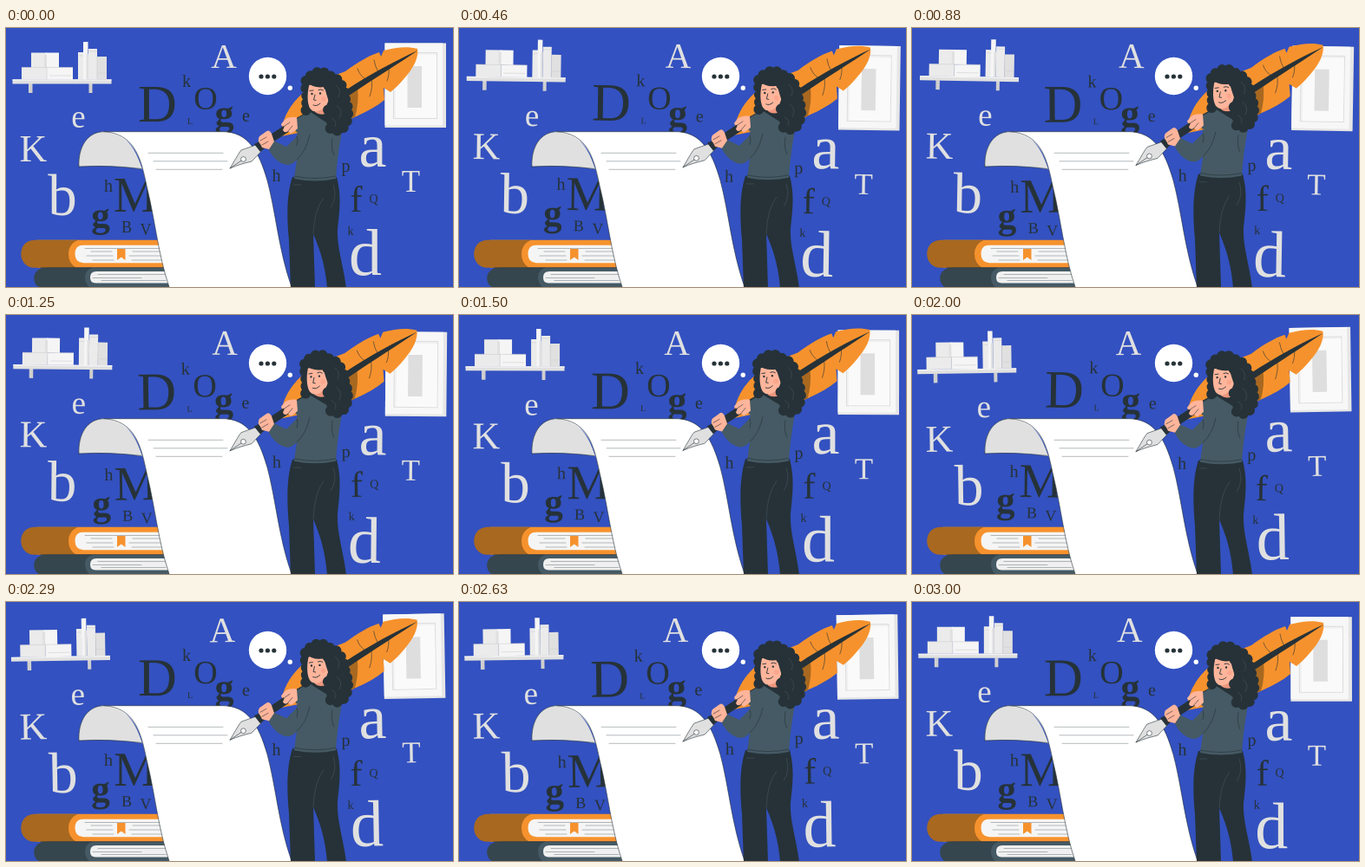
Animation of 515 by 299 pixels, one loop 3.04 s. Source, as an HTML page:

```html
<!DOCTYPE html>
<html lang="en">
<head>
<meta charset="utf-8">
<title>Writer with a quill</title>
<style>
html, body { margin: 0; width: 100%; height: 100%; overflow: hidden; background: #3351c0; }
svg { display: block; width: 100vw; height: 100vh; }
text { font-family: "Liberation Serif", "Noto Serif", serif; text-anchor: middle; }
.line { fill: none; stroke: #263238; stroke-width: .6; stroke-linecap: round; stroke-linejoin: round; }
.dark { fill: #263238; }
.teal { fill: #455a64; }
.orange { fill: #f6922d; }
.brown { fill: #a86820; }
.skin { fill: #ffb59b; }
.pale { fill: #e0e0e0; }
.white { fill: #fff; }
.soft { stroke: #6b7579; stroke-width: .5; }
.curls { fill: none; stroke: #263238; stroke-width: 12; stroke-linecap: round; stroke-dasharray: 0 8.5; }
</style>
</head>
<body>
<svg viewBox="0 0 515 299">
  <g id="light">
    <!-- shelf -->
    <path fill="#cfcfcf" d="M26 64h4.500v11h-4.500zM95.500 64h4v11h-4z"/>
    <path class="pale" d="M7.500 59.500h114v5h-114z"/>
    <path fill="#f2f2f2" d="M7.500 59.300h114v1.500h-114z"/>
    <path fill="#ebebeb" d="M29 28.500h18v17H29zM18 45.500h29v14H18zM83 28h6.500v31.500H83zM95 24h10v35.500H95z"/>
    <path fill="#f5f5f5" d="M46 28.500h15v17H46zM47 45.500h30v14H47zM89 16h5.500v43.500H89z"/>
    <path class="pale" d="M105 33h11v26.500h-11zM44 31h3v14.500h-3zM92.500 30h2.500v29.500h-2.500z"/>
    <path fill="none" stroke="#cfcfcf" stroke-width=".6" d="M18 45.500h59M47 45.500v14M84 32h5M95 27h10M105 33v26M106 52h9M50 55h25"/>
    <!-- picture -->
    <path fill="#e6e6e6" d="M436.500 17.500H507V115H436.500z"/>
    <path fill="#f7f7f7" d="M436.500 17.500H503V112.500H436.500z"/>
    <path fill="#f1f1f1" stroke="#dcdcdc" d="M446.500 28.500h50v76h-50z"/>
    <path fill="#fafafa" d="M449 31h47v73h-47z"/>
    <path fill="#dedede" d="M462.500 44H479v48h-16.500z"/>
  </g>
  <g id="ink"></g>

  <!-- books -->
  <path class="orange" d="M36 244.700H200V276.700H36z"/>
  <path class="brown" d="M33 244.700C12 244.700 12 276.700 33 276.700H81Q72 272 72 260.700T83 244.700z"/>
  <path fill="#f5f5f5" d="M200 250.700H89Q79.500 250.700 79.500 260.700T89 271.200H200z"/>
  <path class="orange" d="M128 255h9.500v13l-4.700-3.500-4.800 3.500z"/>
  <path class="line soft" d="M91 254.500h94M98 258h24M146 258h38M93 263h30M142 263h43M100 268h24M145 268h40"/>
  <path class="teal" d="M48 276.700H200V299H48z"/>
  <path fill="#35464e" d="M46 276.700C30 276.700 29 294 38 299H96Q91 295 91 287.500T99 276.700z"/>
  <path fill="#f0f0f0" d="M200 281H104Q97 281 97 288T104 294.500H200z"/>
  <path class="line soft" d="M106 284.500h78M100 288.500h56M110 291.500h74"/>
  <path class="line" d="M40 276.700H186"/>

  <!-- scroll -->
  <path class="pale" d="M84 160C83 137 94 119.700 113 119.700 139 121 149 139 157 163 130 159 108 158.500 84 160z"/>
  <path class="white" d="M108 119.700H250C278 120 291 141 301 176 311 213 314 257 329 299H188C175 261 172 222 162 182 155 147 147 122 108 119.700z"/>
  <path class="line" d="M84 160C83 137 94 119.700 113 119.700H250C278 120 291 141 301 176 311 213 314 257 329 299M84 160Q120 158 156 162.500M113 119.700C147 122 155 147 162 182 172 222 175 261 188 299"/>
  <path class="line soft" d="M164 144.300H250M170 153.800H255M173 163.300H249"/>

  <!-- thought bubble -->
  <circle class="white" cx="301.500" cy="55.500" r="21.700"/>
  <circle class="white" cx="327.300" cy="69.300" r="2.700"/>
  <g class="dark"><circle cx="294" cy="56" r="2.600"/><circle cx="301.400" cy="56" r="2.600"/><circle cx="308.800" cy="56" r="2.600"/></g>

  <!-- trousers -->
  <g id="legs">
    <path class="dark" d="M330 172C324 190 323 214 326 245L328 300H356L354 238C362 256 368 275 370 300H392C389 275 381 254 382 232 384 213 387 194 381 172z"/>
    <path fill="none" stroke="#46555c" stroke-width=".6" d="M354 238Q355 210 366 196M377 181Q382 196 374 207M331 181H340"/>
  </g>

  <g id="body">
    <g id="quill">
      <path class="orange" d="M317 125C317 103 331 80 355 66 369 58 381 54 391 50 406 39 418 32 430 28L432 33 435 26C450 22 463 21 474 24 476 34 469 47 459 58 453 65 448 70 443 74L435 69 436 83C418 98 391 108 366 115 348 119 332 122 317 125z"/>
      <path class="brown" d="M331 115L394 76 405 69Q407 86 402 103 370 116 336 120z"/>
      <path class="dark" d="M474.500 26C450 37 420 53 391 72L329 107 291 132 295 140 333 115 395 78C425 58 452 41 474.500 26z"/>
      <path class="line" d="M429 51Q425 44 424 37M414 59Q407 54 405 47M441 45Q442 54 439 61M421 59Q423 68 419 79"/>
      <path class="pale" stroke="#263238" stroke-width=".6" d="M258 162C263 154 267 146 271 141L288 135 294 142.500 283 154C275 156 267 158 258 162z"/>
      <path class="line" d="M258 162L272 152.500"/>
      <circle class="white" cx="273.500" cy="151.500" r="2.900" stroke="#263238" stroke-width=".6"/>
      <path class="dark" d="M286 134L294 130 299 138 293 143z"/>
    </g>
    <!-- far hand -->
    <path class="teal" d="M331 107L350 96 351 116 334 120z"/>
    <path class="skin" d="M335 103Q326 102 321 106L317 111Q317 114 321 113L319 118Q321 122 325 119L328 122Q333 119 336 116z"/>
    <path class="line" d="M321 113L327 109M325 119L330 113"/>
    <!-- sweater -->
    <path class="teal" d="M349 96C339 101 336 113 335 125L323 137 308 130 301 137C306 148 314 157 324 158Q330 158 335 152L332 174Q356 179 380 174C381 158 383 142 386 125 389 107 382 97 368 95z"/>
    <path fill="none" stroke="#263238" stroke-width=".6" d="M335 152Q346 142 350 123M332 171Q356 176 380 171M335 125Q337 130 335 136M376 127Q374 139 378 147"/>
    <!-- near hand -->
    <path class="skin" d="M309 131L306 122Q303 116 299 120L292 125Q289 130 293 134L295 138 303 140z"/>
    <path class="line" d="M293 130L300 126M295 135L302 131"/>
    <g id="head">
      <path class="dark" d="M347 57C352 49 365 50 371 54 385 55 391 70 392 82 398 99 395 111 387 117 379 120 371 116 369 109L346 94z"/>
      <path class="curls" d="M345.500 95Q347 82 345.500 70T349 56 359 51 371 55C386 57 389 70 391 82 397 97 394 110 387 117 379 121 372 117 370 110"/>
      <path fill="#ed967e" d="M357 90L370 86 368 99Q361 101 356 97z"/>
      <path class="skin" d="M350 63C347 74 347 83 349 90 351 96 356 98 362 95 369 92 373 84 373 74L371 63z"/>
      <path class="curls" d="M349 60Q354 56 360 59T370 65 377 80 374 91 374 103"/>
      <path class="dark" d="M346 62Q360 52 372 60L380 90 374 92Q369 76 367 68 354 70 346 62z"/>
      <g class="dark"><circle cx="352.500" cy="76" r="1.200"/><circle cx="362" cy="75.500" r="1.200"/></g>
      <path class="line" style="stroke-width:.9" d="M350 72.500L354 72M360 71.500Q363 70 365.500 72M356 77L354.500 83 357 83.500M354 89Q358 91 362 87"/>
      <circle cx="366" cy="82" r="2.800" fill="#f59178" opacity=".4"/>
      <path fill="none" stroke="#4b5a61" stroke-width=".5" d="M380 66Q387 72 383 80M381 89Q389 95 384 104M375 104Q382 108 379 114"/>
    </g>
  </g>
</svg>
<script>
const LOOP = 3040;
const $ = id => document.getElementById(id);

// letter, centre, baseline, size, optional bold mark
const lightLetters = "A 251 46 41,K 31.5 154.5 44,e 83.5 115.5 37,b 65 216.5 67,a 422.5 160 72,d 414 284.5 76,T 466.5 189 35";
const inkLetters = "D 174.5 108 62,k 208 68 20,O 230 94 38,g 251.5 113 44 b,L 212 111 10,e 276.500 108 20," +
  "h 118 189 20,M 149 212 56,g 109 230 43 b,B 139 236 18,V 161 239 18,h 311.5 177 20,p 391.5 166 20," +
  "f 403.5 212 42,Q 423.5 202 14,k 397 239 14";

function addLetters(group, list, fill) {
  for (const item of list.split(",")) {
    const [char, x, y, size, bold] = item.split(" ");
    const el = document.createElementNS("http://www.w3.org/2000/svg", "text");
    el.textContent = char;
    const attrs = { x, y, fill, "font-size": size, "font-weight": bold ? 700 : 400 };
    for (const key in attrs) el.setAttribute(key, attrs[key]);
    group.append(el);
  }
}
addLetters($("light"), lightLetters, "#e0e0e0");
addLetters($("ink"), inkLetters, "#263238");

const move = (id, value) => $(id).setAttribute("transform", value);

function draw(now) {
  const phase = now % LOOP / LOOP * 2 * Math.PI;
  const rise = (1 - Math.cos(phase)) / 2;
  const lift = 5.6 * rise;
  move("light", `rotate(${Math.sin(phase)} 257.5 149.5)`);
  move("ink", `rotate(${0.9 * Math.sin(2 * phase)} 257.5 149.5)`);
  move("body", `translate(0 ${-lift})`);
  move("quill", `rotate(${-0.35 * rise} 258 162)`);
  move("head", `rotate(${-2 * rise} 370 108)`);
  // feet stay put while the waist follows the body
  move("legs", `translate(0 300) scale(1 ${1 + lift / 127}) translate(0 -300)`);
}

const start = performance.now();
(function frame() {
  draw(performance.now() - start);
  requestAnimationFrame(frame);
})();
</script>
</body>
</html>
```
